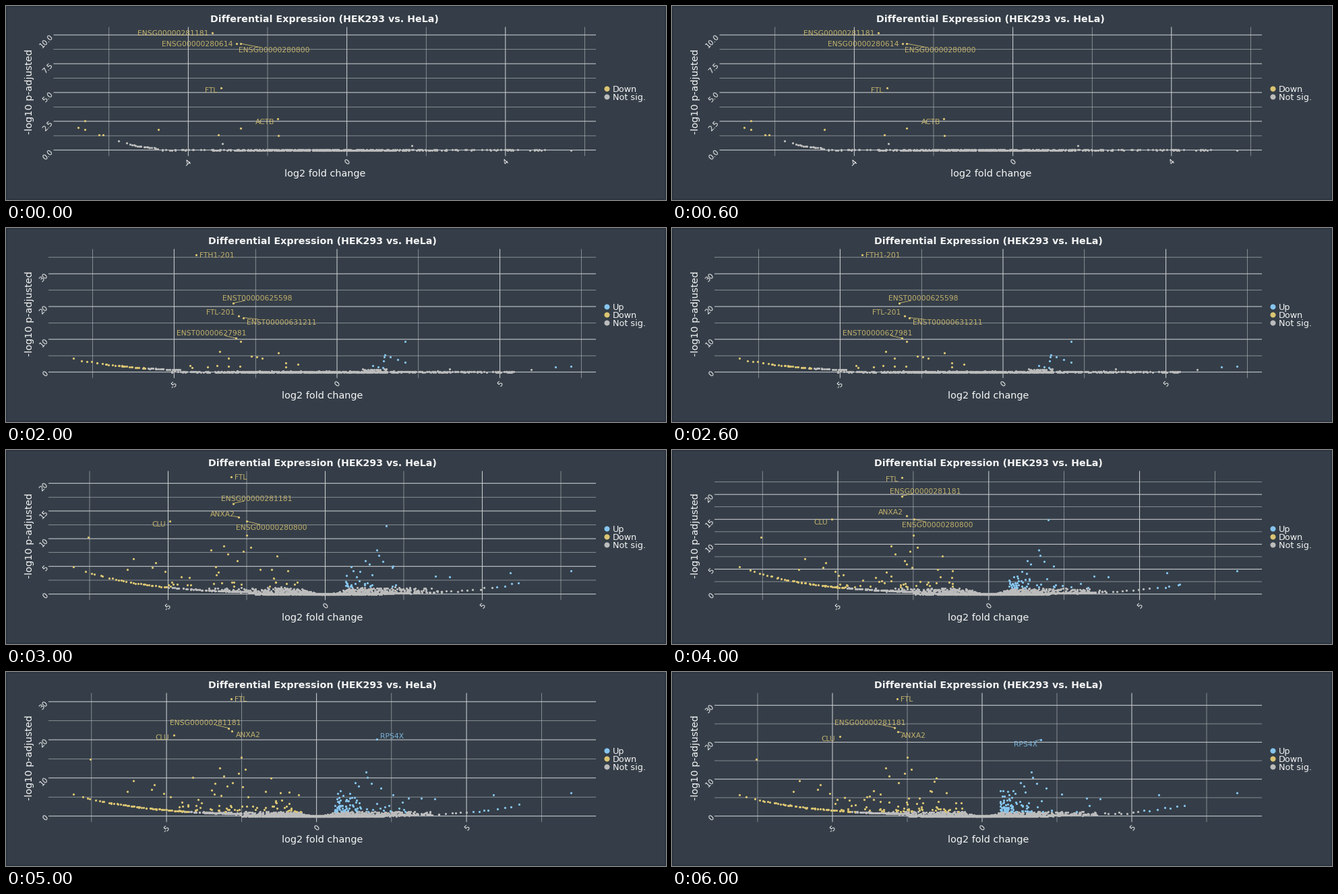
These frames come from a looping animation (979x289 px, 7000 ms). A matplotlib script:

```python
import numpy as np
import matplotlib.pyplot as plt
from matplotlib.animation import FuncAnimation
from matplotlib.patches import Rectangle

W, H, DPI = 979, 289, 64
PT = 72 / DPI  # points per pixel
RIGHT, TOP, BOTTOM, BASE = 875, 31.3, 223.5, 214.6
SIG = 1.3      # -log10 p threshold
LABEL = 10.7   # gene label size in pixels

BG, EDGE, GRID, INK = "#353e48", "#2d3640", "#cacccf", "#f4f4f4"
UP, DOWN, NOT = "#86c5ee", "#dbc573", "#bcbcbc"

plt.rcParams["font.family"] = "DejaVu Sans"

# Strong genes of the later views: (log2 fold change, height in pixels)
STRONG = [(-7.54, 85), (-2.5, 88), (-2.37, 70), (-3.23, 72), (-3.1, 60),
          (-2.6, 64), (-1.53, 57), (-6.1, 53), (-5.4, 47), (-5.5, 40),
          (-5.1, 34), (-6.3, 37), (-1.7, 37), (-1.2, 35), (-2.8, 50),
          (-3.4, 33), (1.65, 66), (1.7, 58), (1.28, 50), (1.4, 45),
          (1.83, 49), (2.15, 42), (1.1, 34), (5.9, 32), (3.5, 27),
          (3.95, 26)]

# Each view: left panel edge, pixel of x = 0, pixels per unit (x, y), tick
# steps, labelled genes (name, x, y, label left, label middle), single points
# and settings of the random layers.
week1 = dict(
    left=70.5, x0=505.6, sx=58.8, sy=17.15, xstep=4, ystep=2.5,
    genes=[("ENSG00000281181", 306, 40, 196, 40),
           ("ENSG00000280614", 342, 56, 232, 56.5),
           ("ENSG00000280800", 348, 56, 346, 65.5),
           ("FTL", 319, 121.5, 296, 125.5),
           ("ACTB", 403, 167.5, 370, 172.5)],
    extra=[(107, 180.5), (117, 171), (117, 183.5), (138, 191.5), (144, 192.3),
           (226, 183.5), (315, 191.5), (348, 182), (404, 192.5), (321, 205),
           (602, 208), (838, 214.6)],
    tail=(167, 225, 20, 14, 35), cloud=(480, 72, 400, 0.3),
    flat=(228, 800, 130))

week2 = dict(
    left=63, x0=492.9, sx=51.34, sy=5.44, xstep=4, ystep=10,
    genes=[("FTH1-201", 278, 40, 284, 40),
           ("ENST00000631211", 347, 116.5, 331, 108),
           ("FTL-201", 341, 133, 348, 127.5),
           ("ENST00000625598", 329, 145.5, 234, 137.5),
           ("ENST00000627981", 320, 160, 312, 160.5)],
    extra=[(332, 153), (388.5, 166), (370, 191.5), (582, 183), (618, 198),
           (621, 197), (810, 208.5), (838, 205)],
    tail=(100, 260, 44, 18, 90), cloud=(450, 85, 480, 1.2),
    flat=(250, 765, 190), bump=(551, 12, 30), rain=(9, 10, 60, 12))

week3 = dict(
    left=63, x0=491, sx=48.32, sy=4.88, xstep=5, ystep=10,
    genes=[("FTH1-201", 281.5, 40, 287, 40),
           ("ENST00000625598", 336.5, 112, 321, 104),
           ("FTL-201", 345, 130.5, 297, 125),
           ("ENST00000631211", 352, 133.5, 357, 140),
           ("ENST00000627981", 341, 164, 254, 156.5)],
    extra=[(348, 169), (380, 193.5), (592, 169), (581, 196), (592, 200),
           (658, 209.5), (779, 211), (815, 207), (838, 206)],
    tail=(100, 258, 56, 20, 88), cloud=(450, 85, 520, 1.4),
    flat=(255, 755, 240), bump=(546, 11, 28), rain=(14, 7, 52, 12))

week4 = dict(
    left=63, x0=473.5, sx=46.6, sy=8.25, xstep=5, ystep=5,
    genes=[("FTL", 333.5, 40, 339, 40),
           ("ENSG00000281181", 337, 79.5, 320, 72),
           ("ANXA2", 345, 100, 303, 95),
           ("CLU", 242.5, 106, 217, 110.5),
           ("ENSG00000280800", 357, 106, 341, 115),
           ("", 564, 112.5, 0, 0)],
    tail=(100, 370, 95, 41, 100), cloud=(473.5, 72, 1050, 9),
    rain=(26, 26, 30, 28))

week5 = dict(
    left=63, x0=469.8, sx=44.75, sy=7.42, xstep=5, ystep=5,
    genes=[("FTL", 341, 40.5, 317, 43.5),
           ("ENSG00000281181", 340.5, 68.5, 324, 61),
           ("ANXA2", 347.5, 97.5, 306, 92),
           ("CLU", 236.5, 103, 211, 107.5),
           ("ENSG00000280800", 359, 103, 342, 111.5),
           ("", 557.5, 104, 0, 0)],
    tail=(100, 360, 110, 41, 105), cloud=(469.8, 70, 1150, 9),
    rain=(36, 42, 30, 26))

week6 = dict(
    left=63, x0=460.6, sx=44.5, sy=5.68, xstep=5, ystep=10,
    genes=[("FTL", 334, 40, 340, 40),
           ("ENSG00000281181", 330, 83.5, 243, 75),
           ("ANXA2", 335, 88, 341, 93.5),
           ("CLU", 249, 94, 222, 97.5),
           ("RPS4X", 549.5, 99.5, 555, 95)],
    tail=(100, 350, 120, 32.5, 108), cloud=(460.6, 70, 1150, 7),
    rain=(60, 72, 27, 28))

week7 = dict(
    left=63, x0=460, sx=44.4, sy=5.5, xstep=5, ystep=10,
    genes=[("FTL", 334, 40, 340, 40),
           ("ENSG00000281181", 330, 83, 242, 75),
           ("ANXA2", 334.5, 88.5, 340, 94.5),
           ("CLU", 248.5, 95.5, 222, 99),
           ("RPS4X", 547, 100.5, 507, 107)],
    tail=(100, 350, 120, 31.5, 108), cloud=(460, 70, 1150, 7),
    rain=(62, 74, 27, 28))

VIEWS = [week1, week2, week3, week4, week5, week6, week7]

fig = plt.figure(figsize=(W / DPI, H / DPI), dpi=DPI, facecolor=BG)
ax = fig.add_axes([0, 0, 1, 1])


def rise(x):
    """Lower edge of the right arm."""
    return 16 * np.exp((x - 760) / 75)


def random_points(v, rng):
    """Unlabelled genes as (x, y) in pixels."""
    parts = []
    limit = SIG * v["sy"]
    late = "extra" not in v

    def add(x, h):
        parts.append(np.column_stack([x, BASE - np.maximum(h, 0)]))

    # left arm: single dots that close up while they sink
    start, end, n, height, k = v["tail"]
    x = start + (end - start) * np.linspace(0, 1, n) ** 0.6
    x += rng.normal(0, 1.5, n) * (x > start)
    add(x, height * np.exp((start - x) / k) + rng.normal(0, 0.25, n))

    # bulk around zero, thin in the middle and limited by the arms
    mid, sd, n, top = v["cloud"]
    d = np.clip(rng.normal(0, sd, n), -2.4 * sd, 2.4 * sd)
    x = mid + d
    h = np.minimum(top, 0.3 + 0.008 * d**2) * rng.random(n) ** 4
    if late:
        arm = np.where(x < end, height * np.exp((start - x) / k), 0)
        h = np.maximum(h, np.where(x > 560, rise(x), arm))
    add(x, h)

    if "flat" in v:
        lo, hi, n = v["flat"]
        u = rng.random(n)
        add(lo + (hi - lo) * u, 0.4 * rng.random(n))
    if "bump" in v:
        mid, sd, n = v["bump"]
        add(rng.normal(mid, sd, n), 5 * rng.random(n))
    if "rain" in v:
        a, b, gap, spread = v["rain"]
        add(rng.uniform(240, 435, a), limit + rng.exponential(9, a))
        x = v["x0"] + gap + np.minimum(rng.exponential(spread, b), 150)
        add(x, limit + np.minimum(rng.exponential(8, b), 30))
    if late:
        n = 42
        x = 560 + 200 * np.linspace(0, 1, n) ** 2.2 + rng.normal(0, 2, n)
        add(x, rise(x) + rng.normal(0, 0.7, n))
        add(rng.uniform(310, 438, 40), limit * rng.uniform(0.4, 0.95, 40))
        add(v["x0"] + rng.uniform(34, 150, 45),
            limit * rng.uniform(0.4, 0.95, 45))
        fc, h = np.array(STRONG).T
        add(v["x0"] + fc * v["sx"], h)
        add([838], [35])
    return np.vstack(parts + ([] if late else [v["extra"]]))


def line(x, y, px, color=GRID, z=1):
    ax.plot(x, y, color=color, lw=px * PT, solid_capstyle="butt",
            snap=False, zorder=z)


def text(x, y, s, px, **kw):
    kw = {"color": INK, "va": "baseline", "zorder": 5, **kw}
    ax.text(x, y, s, fontsize=px * PT, **kw)


def dots(pts, color, px, z=3):
    ax.scatter(pts[:, 0], pts[:, 1], s=(px * PT) ** 2, color=color,
               linewidths=0, zorder=z)


def draw_grid(v):
    left = v["left"]
    tick = dict(ha="right", rotation=45, rotation_mode="anchor")
    for i in range(-4, 5):
        x = v["x0"] + i * v["xstep"] / 2 * v["sx"]
        if left < x < RIGHT:
            major = i % 2 == 0
            line([x, x], [TOP, BOTTOM], 1.07 if major else 0.53)
            if major:
                text(x + 5.6, 232.4, str(i // 2 * v["xstep"]), 10.8, **tick)
    for i in range(12):
        y = BASE - i * v["ystep"] / 2 * v["sy"]
        if y > TOP:
            major = i % 2 == 0
            line([left, RIGHT], [y, y], 1.07 if major else 0.53)
            if major:
                value = i // 2 * v["ystep"]
                text(left + 0.1, y + 2.8, str(float(value))
                     if v["ystep"] == 2.5 else str(value), 10.8, **tick)


def draw_label(name, x, y, left, mid, color):
    """Gene name, with a line from the dot towards the label's centre."""
    text(left - 0.5, mid + 3.6, name, LABEL, color=color, alpha=0.85)
    half = 0.325 * LABEL * len(name)
    dx, dy = left + half - x, mid - y
    reach = 1 - min(half / max(abs(dx), 1e-6), 4 / max(abs(dy), 1e-6))
    if reach * np.hypot(dx, dy) > 6.9:
        line([x, x + reach * dx], [y, y + reach * dy], 0.8, color, 3)


def draw_legend(names):
    y = 129.1 - 6 * (len(names) - 1)
    for name, color in names:
        dots(np.array([[891.3, y]]), color, 8)
        text(899.6, y + 4.9, name, 12.8)
        y += 12


def update(i):
    v = VIEWS[i]
    ax.clear()
    ax.set(xlim=(0, W), ylim=(H, 0))
    ax.axis("off")
    ax.add_patch(Rectangle((0, 0), W, H, fc=BG, ec=EDGE, lw=4 * PT, zorder=0))
    draw_grid(v)

    rng = np.random.default_rng(20 + i)
    named = [(x, y) for _, x, y, *_ in v["genes"]]
    pts = np.vstack([random_points(v, rng), named])
    sig = BASE - pts[:, 1] > SIG * v["sy"] - 0.5
    below = pts[:, 0] < v["x0"]
    dots(pts[~sig], NOT, 3.2)
    dots(pts[sig & below], DOWN, 3.2, 4)
    dots(pts[sig & ~below], UP, 3.2, 4)
    for name, x, *place in v["genes"]:
        if name:
            draw_label(name, x, *place, DOWN if x < v["x0"] else UP)

    mid = (v["left"] + RIGHT) / 2
    text(mid, 24, "Differential Expression (HEK293 vs. HeLa)", 14.28,
         ha="center", weight="bold")
    text(mid, 254, "log2 fold change", 14.4, ha="center")
    text(38.5, 127.5, "-log10 p-adjusted", 14.4, ha="center", rotation=90,
         rotation_mode="anchor")
    names = [("Up", UP), ("Down", DOWN), ("Not sig.", NOT)]
    draw_legend(names if i else names[1:])
    return []


anim = FuncAnimation(fig, update, frames=len(VIEWS), interval=1000,
                     init_func=lambda: [], repeat=True, repeat_delay=0)
plt.show()
```
